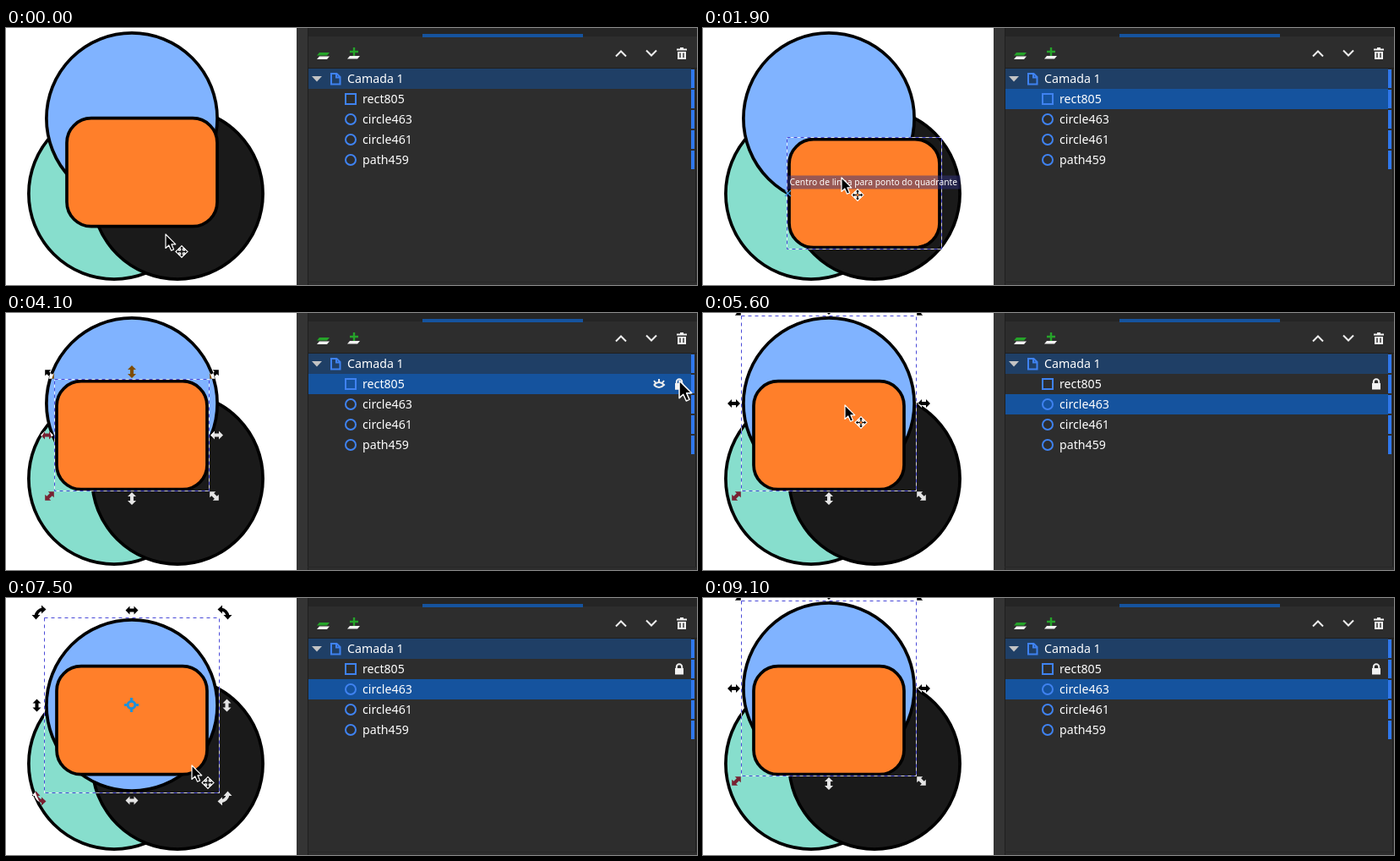
Animation of 818 by 304 pixels, one loop 9.4 s. Source, as an HTML page:

```html
<!DOCTYPE html>
<html lang="pt">
<head>
<meta charset="utf-8">
<title>Bloquear objeto</title>
<style>
  html, body { margin: 0; width: 100%; height: 100%; overflow: hidden; background: #fff; }
  svg { display: block; width: 818px; height: 304px; }
  text { font-family: "Noto Sans", "Open Sans", sans-serif; font-size: 14.2px; fill: #fff; }
  .shape { stroke: #000; stroke-width: 3.7; }
  .invert { mix-blend-mode: difference; fill: #fff; }
  .line { fill: none; stroke: #eee; stroke-width: 2; }
  .blue { fill: none; stroke: #3f82f0; stroke-width: 2; }
  .icon { fill: #f2f2f2; }
  #tip text { font-size: 10.3px; }
</style>
</head>
<body>
<svg viewBox="0 0 818 304">
  <defs>
    <path id="scale" d="M-7.5 0L-2.5-5V-2H2.5V-5L7.5 0L2.5 5V2H-2.5V5Z"/>
    <g id="rotate">
      <path d="M-4 4A9 9 0 0 1 4-4" fill="none" stroke="#fff" stroke-width="4"/>
      <path d="M-9 2.5H1L-4 8ZM2.5-9V1L8-4Z"/>
    </g>
    <path id="arrow" d="M0 0V16.5L3.8 13L6.6 19.2L9.6 17.9L6.9 11.8H11.8Z"
      stroke="#fff" stroke-width="1.2" stroke-linejoin="round"/>
    <path id="spike" d="M-1.3-1.3V-3.4H-3.4L0-7L3.4-3.4H1.3V-1.3"/>
    <path id="lockBody" class="icon" d="M-5-1H5V6.5H-5Z"/>
  </defs>

  <rect width="818" height="304" fill="#fff"/>
  <circle class="shape" cx="128" cy="196" r="101.1" fill="#87decd"/>
  <circle class="shape" cx="203" cy="196" r="101.1" fill="#1a1a1a"/>
  <circle class="shape" id="disc" cx="149" cy="107" r="101.1" fill="#80b3ff"/>
  <rect class="shape" id="box" x="72" y="106.7" width="178" height="128" rx="29" fill="#ff7f2a"/>

  <g id="frame" fill="none">
    <rect stroke="#fff" stroke-opacity=".8"/>
    <rect stroke="#4a4ad8" stroke-dasharray="4 4"/>
  </g>
  <g id="handles" class="invert"></g>
  <g id="pivot" fill="none" stroke="#2090d8" stroke-width="3">
    <circle r="4.3"/>
    <path d="M0-8.5V-4M0 8.5V4M-8.5 0H-4M8.5 0H4"/>
  </g>
  <g id="tip">
    <path d="M-3.5-3.5L3.5 3.5M-3.5 3.5L3.5-3.5" stroke="#3a90d8" stroke-width="1.2"/>
    <rect x="-1" y="-21" width="205" height="16" fill="#33337f" fill-opacity=".5"/>
    <text x="2" y="-10">Centro de linha para ponto do quadrante</text>
  </g>

  <rect x="344" width="474" height="304" fill="#2d2d2d"/>
  <rect x="344" width="13" height="304" fill="#343434"/>
  <rect x="357" width="461" height="10" fill="#252525"/>
  <rect x="493" y="7" width="190" height="4" fill="#15539e"/>
  <path d="M357.5 0V304M357 47.5H818M816.5 47V300" stroke="#1f1f1f" fill="none"/>
  <path d="M357 300.5H818" stroke="#272727"/>
  <g id="tools">
    <path d="M371 29H383L380 32.5H368Z" fill="#26a32a"/>
    <path d="M371 33.5H383L380 37H368Z" fill="#f2f2f2"/>
    <path d="M412 23V33M407 28H417" stroke="#26a32a" stroke-width="2.4"/>
    <path d="M407 33H419L416 36.5H404Z" fill="#f2f2f2"/>
    <path class="line" d="M722 33.5L728 27.5L734 33.5M758 26.5L764 32.5L770 26.5"/>
    <path class="icon" d="M798 23H802V24.5H806V26.5H794V24.5H798ZM795 28H805V37H795Z"/>
    <path d="M798 29.5V35M802 29.5V35" stroke="#2d2d2d" stroke-width="1.4"/>
  </g>
  <rect x="358" y="48" width="453" height="24" fill="#1f3f66"/>
  <rect id="row" x="358" width="453" height="24" fill="#15539e"/>
  <path d="M362 57H374L368 63.5Z" fill="#c4c4c4"/>
  <path class="blue" d="M385 54H391.5L395.5 58V66.5H385ZM391 54V58.5H395.5"/>
  <text x="404" y="65">Camada 1</text>
  <g id="rows"></g>
  <g id="hover">
    <path class="line" transform="translate(773 84)" d="M-6 1Q0-5 6 1Q0 7-6 1M0-2.5V-6M-4-1.5L-6-4M4-1.5L6-4"/>
    <use href="#lockBody" x="797" y="84"/>
    <path id="open" class="line" d="M799 83V81A2.8 2.8 0 0 1 804.5 81V83"/>
  </g>
  <g id="lock">
    <use href="#lockBody" x="797" y="84"/>
    <path class="line" d="M793.8 84V81.5A3.2 3.2 0 0 1 800.2 81.5V84"/>
  </g>

  <g id="cursor">
    <use id="pointer" href="#arrow"/>
    <g id="move" transform="translate(19 20.5)" stroke="#fff" stroke-width="1.2">
      <use href="#spike"/>
      <use href="#spike" transform="rotate(90)"/>
      <use href="#spike" transform="rotate(180)"/>
      <use href="#spike" transform="rotate(270)"/>
    </g>
  </g>
</svg>

<script>
const LOOP = 9400, STEP = 100;
const PICK_BOX = 1000, PICK_DISC = 5400, LOCK = 4100, TURN = 7100, LEAVE = 9000;

// A move is [start, end, x, y]: glide to x, y during that time.
const pointerMoves = [
  [300, 1100, 142, 171], [1600, 1900, 164, 177], [1900, 2200, 152, 155],
  [2200, 2500, 650, 100], [2500, 3600, 797, 80], [4200, 5500, 168, 109],
  [5700, 6200, 168, 131], [6700, 7400, 220, 198], [7700, 8200, 220, 178],
  [8800, 9000, 300, 150]
];
const boxMoves = [[1600, 1900, 30, 25], [1900, 2200, -12, -26]];
const discMoves = [[5700, 6200, 0, 20], [7700, 8200, 0, 0]];
const drags = [[1600, 2200], [5800, 6700], [7800, 8800]];
// Snap hints: [start, end, anchor], anchor as a share of the selection's width.
const snaps = [[1800, 2000, 0], [2100, 2200, .5], [6200, 6600, .5], [8300, 8700, .5]];

const $ = id => document.getElementById(id);
const show = (id, on) => { $(id).style.display = on ? '' : 'none'; };
const place = (id, x, y) => $(id).setAttribute('transform', `translate(${x} ${y})`);
const during = (list, t) => list.find(([a, b]) => t >= a && t < b);
const ease = p => p * p * (3 - 2 * p);

function glide(t, moves, x = 0, y = 0) {
  for (const [a, b, tx, ty] of moves) {
    const p = ease(Math.min(1, Math.max(0, (t - a) / (b - a))));
    x += (tx - x) * p;
    y += (ty - y) * p;
  }
  return [x, y];
}

// Eight handles: sides and corners alternate around the selection.
function handleMarkup({ x, y, width, height }, turning) {
  let out = '';
  for (let i = 0; i < 8; i++) {
    const corner = i % 2, a = i * Math.PI / 4, gap = corner ? 6 : 9;
    const sx = Math.round(Math.cos(a)), sy = Math.round(Math.sin(a));
    const px = x + width / 2 + sx * (width / 2 + gap);
    const py = y + height / 2 + sy * (height / 2 + gap);
    const shape = turning && corner ? 'rotate' : 'scale';
    const deg = i * 45 + (turning ? (corner ? 135 : 90) : 0);
    out += `<use href="#${shape}" transform="translate(${px} ${py}) rotate(${deg})"/>`;
  }
  return out;
}

function buildRows() {
  let out = '';
  ['rect805', 'circle463', 'circle461', 'path459'].forEach((name, i) => {
    const y = 84 + i * 24;
    out += i ? `<circle class="blue" cx="408" cy="${y}" r="6"/>`
             : `<rect class="blue" x="402" y="${y - 6}" width="12" height="12"/>`;
    out += `<text x="422" y="${y + 5}">${name}</text>`;
  });
  for (let i = 0; i < 5; i++)
    out += `<rect x="811" y="${49 + i * 24}" width="4" height="22" fill="#2f78ee"/>`;
  $('rows').innerHTML = out;
}

function drawSelection(t, box, disc) {
  const selected = t >= PICK_BOX, onDisc = t >= PICK_DISC;
  const turning = t >= TURN && t < drags[2][0];
  const area = onDisc
    ? { x: 45.5 + disc[0], y: 3.5 + disc[1], width: 207, height: 207 }
    : { x: 69.5 + box[0], y: 104.5 + box[1], width: 183, height: 132 };
  const midY = area.y + area.height / 2;

  show('row', selected);
  $('row').setAttribute('y', onDisc ? 96 : 72);
  show('frame', selected);
  for (const r of $('frame').children)
    for (const k in area) r.setAttribute(k, area[k]);
  $('handles').innerHTML = selected && !during(drags, t) ? handleMarkup(area, turning) : '';
  show('pivot', turning);
  place('pivot', area.x + area.width / 2 - .5, midY - .5);

  const snap = during(snaps, t);
  show('tip', snap);
  if (snap) place('tip', area.x + area.width * snap[2] + 1, midY);
}

function drawPointer(t) {
  const [x, y] = glide(t, pointerMoves, 189, 244);
  const row = Math.floor((y - 48) / 24), locked = t >= LOCK;
  show('cursor', t < LEAVE);
  place('cursor', x, y);
  $('pointer').setAttribute('transform', `scale(${x > 344 ? 1.25 : 1})`);
  show('move', x < 306);
  show('hover', x > 600 && row >= 0 && row < 5);
  place('hover', 0, (row - 1) * 24);
  show('open', !locked || row !== 1);
  show('lock', locked);
}

function draw(t) {
  const box = glide(t, boxMoves), disc = glide(t, discMoves);
  place('box', ...box);
  place('disc', ...disc);
  drawSelection(t, box, disc);
  drawPointer(t);
}

buildRows();
const start = performance.now();
let last = -1;
function tick() {
  const t = Math.floor((performance.now() - start) % LOOP / STEP) * STEP;
  if (t !== last) draw(last = t);
  requestAnimationFrame(tick);
}
tick();
</script>
</body>
</html>
```
